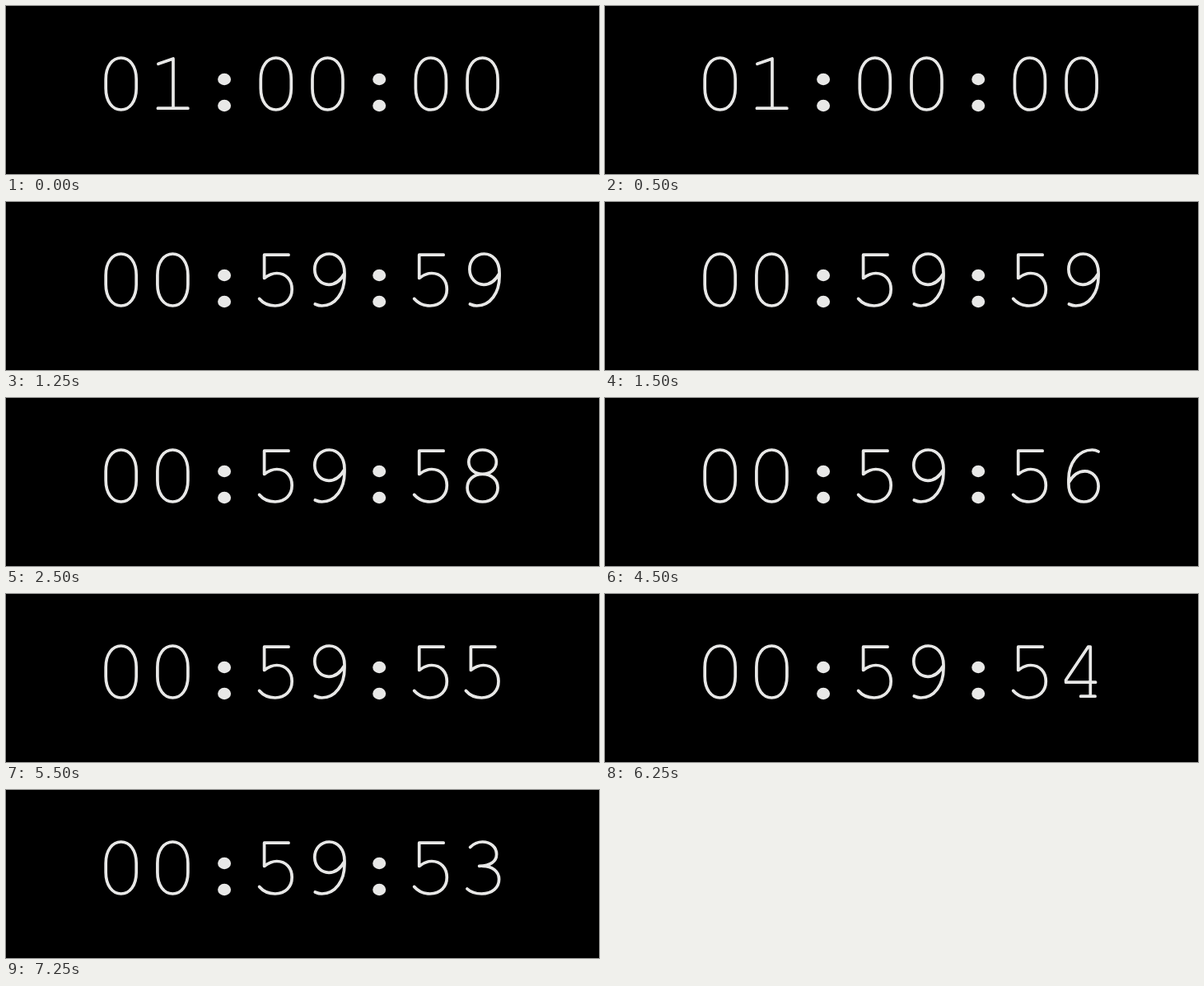
Recreate the animation shown at these times as an HTML page. Size 720 by 204 pixels, loop 8000 ms.

```html
<!DOCTYPE html>
<html lang="en">
<head>
<meta charset="utf-8">
<title>Countdown</title>
<style>
  html, body { margin: 0; width: 100%; height: 100%; overflow: hidden; background: #000; }
  svg { display: block; width: 720px; height: 204px; }
  path { fill: none; stroke: #e8e8e7; stroke-width: 3.7; stroke-linecap: round; stroke-linejoin: round; }
  ellipse { fill: #e8e8e7; }
</style>
</head>
<body>
<svg id="clock" viewBox="0 0 720 204" role="img"></svg>
<script>
const LOOP = 8000, START = 3600, FIRST_TICK = 1250;
const FIRST_X = 139.7, PITCH = 62.7;

// Single-line slab digits; x is relative to the cell centre.
const GLYPHS = {
  0: 'M0 63C10.5 63 18.5 73 18.5 89V100C18.5 116 10.5 126 0 126C-10.5 126 -18.5 116 -18.5 100V89C-18.5 73 -10.5 63 0 63Z',
  1: 'M-17.5 70.3L0.6 64V124.2M-18 124.2H18.5',
  3: 'M-15 69.5C-11 65.5 -6 63 0 63C10 63 17 69.5 17 78C17 86.5 10 92.3 -4 92.3M0 92.3C12 92.3 20 99 20 108.3C20 118.5 12 126 -1 126C-9 126 -14.5 124 -18.7 120',
  4: 'M-1 124.2H16.5M10.7 124.2V64.2H8L-19 104.5V107.2H17',
  5: 'M15.3 64.2H-14.2V92.5C-9 88.5 -4.5 86.5 1 86.5C12 86.5 19.4 94.5 19.4 106C19.4 117.5 11.5 126 -1 126C-9 126 -15.5 123 -20.2 117.5',
  6: 'M20.5 65C18 63.6 16 63 13 63C-4 63 -15.7 79 -15.7 99V104C-15.7 118 -8 126 2.7 126C13 126 20.5 118 20.5 107.3C20.5 96.5 13 88.8 4 88.8C-4 88.8 -10.5 93.3 -15.7 103',
  7: 'M-18.7 72.3V64.2H17.7V68L-0.8 124.2',
  8: 'M0 63C10 63 16.8 69.5 16.8 77.6C16.8 86 10 92.3 0 92.3C-10 92.3 -16.8 86 -16.8 77.6C-16.8 69.5 -10 63 0 63ZM0 92.3C11 92.3 18.5 99.5 18.5 109C18.5 118.5 11 126 0 126C-11 126 -18.5 118.5 -18.5 109C-18.5 99.5 -11 92.3 0 92.3Z',
  9: 'M-15.2 124C-12 125.5 -10 126 -7 126C9.5 126 20.5 110.5 20.5 90V86C20.5 72 12.5 63 2 63C-8 63 -15.7 71 -15.7 81.8C-15.7 92.5 -8 100.3 1.5 100.3C9.5 100.3 15.5 95.5 20.3 87'
};

const svg = document.getElementById('clock');
const slots = [];

function add(tag, attributes) {
  const node = document.createElementNS('http://www.w3.org/2000/svg', tag);
  for (const [key, value] of Object.entries(attributes)) node.setAttribute(key, value);
  return svg.appendChild(node);
}

for (let i = 0; i < 8; i++) {
  const x = FIRST_X + i * PITCH;
  if (i % 3 === 2) {
    for (const cy of [89, 121]) add('ellipse', { cx: x, cy, rx: 8, ry: 7.2 });
  } else {
    slots.push(add('path', { transform: `translate(${x} 0)` }));
  }
}

function clockText(seconds) {
  return [seconds / 3600, seconds / 60 % 60, seconds % 60]
    .map(part => String(Math.floor(part)).padStart(2, '0')).join(':');
}

let shown = '';
function draw(time) {
  const ticks = time < FIRST_TICK ? 0 : 1 + Math.floor((time - FIRST_TICK) / 1000);
  const text = clockText(START - ticks);
  if (text === shown) return;
  shown = text;
  svg.setAttribute('aria-label', text);
  [...text.replaceAll(':', '')].forEach((digit, i) => slots[i].setAttribute('d', GLYPHS[digit]));
}

const origin = performance.now();
function loop() {
  draw((performance.now() - origin) % LOOP);
  requestAnimationFrame(loop);
}
loop();
</script>
</body>
</html>
```
